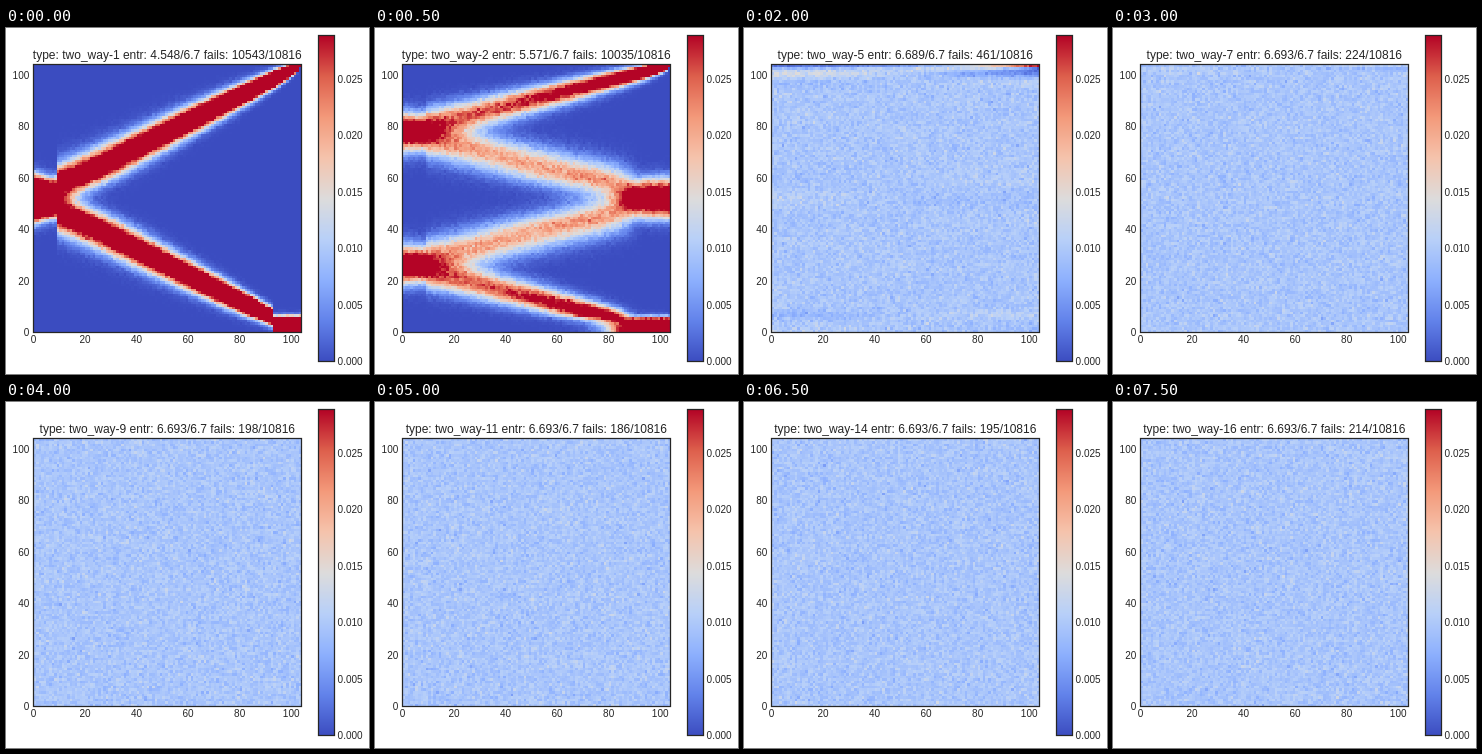
Recreate the animation shown at these times as an HTML page with a canvas. Size 363x346 px, loop 8000 ms.

```html
<!DOCTYPE html>
<html lang="en">
<head>
<meta charset="utf-8">
<style>
  html, body { margin: 0; width: 363px; height: 346px; overflow: hidden; background: #fff; }
  canvas, svg { position: absolute; left: 0; top: 0; }
  text { font: 10px "Liberation Sans", Arial, sans-serif; fill: #262626; }
  #title { font-size: 12px; text-anchor: middle; }
  rect { fill: none; stroke: #262626; stroke-width: 1.25; }
</style>
</head>
<body>
<canvas id="stage" width="363" height="346"></canvas>
<svg id="axes" width="363" height="346">
  <rect x="27.5" y="36.5" width="268" height="268"/>
  <rect x="312.5" y="7.5" width="16" height="326"/>
  <text id="title" x="161.3" y="30.5"></text>
</svg>
<script>
const N = 104, STEP = 500, SAMPLES = 10000, VMAX = 3 / N;
const BOX = { x: 27.5, y: 36.5, w: 268, h: 268 };
const BAR = { x: 312.5, y: 7.5, w: 16, h: 326 };

// entropy and fail count after each shuffle
const STATS = [
  [4.548, 10543], [5.571, 10035], [6.275, 8309], [6.622, 3127],
  [6.689, 461], [6.693, 251], [6.693, 224], [6.693, 205],
  [6.693, 198], [6.693, 207], [6.693, 186], [6.693, 201],
  [6.693, 188], [6.693, 195], [6.693, 203], [6.693, 214]
];

const STOPS = [
  [59, 76, 192], [98, 130, 234], [141, 176, 254], [184, 208, 249], [221, 220, 220],
  [245, 196, 173], [244, 154, 123], [222, 96, 77], [180, 4, 38]
];

function color(v) {
  const p = Math.min(1, Math.max(0, v)) * 8, i = Math.min(7, Math.floor(p));
  return STOPS[i].map((c, k) => c + (STOPS[i + 1][k] - c) * (p - i));
}

function random(seed) {
  return () => {
    seed = (seed + 0x6D2B79F5) | 0;
    let t = Math.imul(seed ^ (seed >>> 15), 1 | seed);
    t = (t + Math.imul(t ^ (t >>> 7), 61 | t)) ^ t;
    return ((t ^ (t >>> 14)) >>> 0) / 4294967296;
  };
}

const row = f => Array.from({ length: N }, (_, i) => f(i));
const sum = a => a.reduce((s, v) => s + v, 0);

function normalize(w) {
  const total = sum(w);
  return w.map(v => v / total);
}

const bell = (mean, sd) => normalize(row(y => Math.exp(-(((y - mean) / sd) ** 2) / 2)));
const block = size => normalize(row(y => 1 / (1 + Math.exp((y - size) * 2))));

// Each card goes to the top or the bottom of the new pile with equal chance;
// the first and last packets are mixed within themselves.
function shuffleMatrix() {
  const last = N - 1, mid = last / 2;
  let m = row(x => {
    const left = last - x, first = x < 9;
    const sd = first ? 3.5 : Math.sqrt(left) / 2 + 0.2;
    const offset = first ? (8 - x) * 0.4 : x / 2;
    const up = bell(mid + offset, sd);
    const down = x > 92 ? block(5) : bell(mid - offset, sd);
    return up.map((v, y) => (v + down[y]) / 2);
  });
  // balance rows and columns so that the limit is uniform
  for (let k = 0; k < 40; k++) {
    const totals = row(y => sum(m.map(r => r[y])));
    m = m.map(r => normalize(r.map((v, y) => v / totals[y])));
  }
  return m;
}

function multiply(a, b) {
  return row(x => row(y => {
    let s = 0;
    for (let z = 0; z < N; z++) s += a[x][z] * b[z][y];
    return s;
  }));
}

function heatmap(m, seed) {
  const c = document.createElement("canvas");
  c.width = c.height = N;
  const g = c.getContext("2d"), img = g.createImageData(N, N), rnd = random(seed);
  for (let x = 0; x < N; x++) for (let y = 0; y < N; y++) {
    const noise = Math.sqrt(-2 * Math.log(1 - rnd())) * Math.cos(2 * Math.PI * rnd());
    const p = m[x][y] + noise * Math.sqrt(m[x][y] / SAMPLES);
    img.data.set([...color(p / VMAX), 255], ((N - 1 - y) * N + x) * 4);
  }
  g.putImageData(img, 0, 0);
  return c;
}

const base = shuffleMatrix();
let power = base;
const maps = STATS.map((_, i) => {
  if (i) power = multiply(power, base);
  return heatmap(power, 100 + i);
});

const ctx = document.getElementById("stage").getContext("2d");
const axes = document.getElementById("axes"), title = document.getElementById("title");

function label(x, y, text, anchor) {
  const t = document.createElementNS("http://www.w3.org/2000/svg", "text");
  t.setAttribute("x", x);
  t.setAttribute("y", y);
  t.setAttribute("text-anchor", anchor);
  t.textContent = text;
  axes.append(t);
}

for (let v = 0; v <= 100; v += 20) {
  label(BOX.x + v / N * BOX.w, 314.5, v, "middle");
  label(23.3, BOX.y + BOX.h * (1 - v / N) + 3.8, v, "end");
}
for (let v = 0; v < 0.027; v += 0.005)
  label(331.6, BAR.y + BAR.h * (1 - v / VMAX) + 3.6, v.toFixed(3), "start");

for (let y = 0; y < BAR.h; y++) {
  ctx.fillStyle = `rgb(${color(1 - y / BAR.h).map(Math.round)})`;
  ctx.fillRect(BAR.x, BAR.y + y, BAR.w, Math.min(1.5, BAR.h - y));
}
ctx.imageSmoothingEnabled = false;

let shown = -1;
function draw(now) {
  const i = Math.floor(now / STEP) % STATS.length;
  if (i !== shown) {
    shown = i;
    const [entropy, fails] = STATS[i];
    ctx.drawImage(maps[i], BOX.x, BOX.y, BOX.w, BOX.h);
    title.textContent = `type: two_way-${i + 1} entr: ${entropy.toFixed(3)}/6.7 fails: ${fails}/10816`;
  }
}

let start;
function tick(now) {
  start ??= now;
  draw(now - start);
  requestAnimationFrame(tick);
}
draw(0);
requestAnimationFrame(tick);
</script>
</body>
</html>
```
